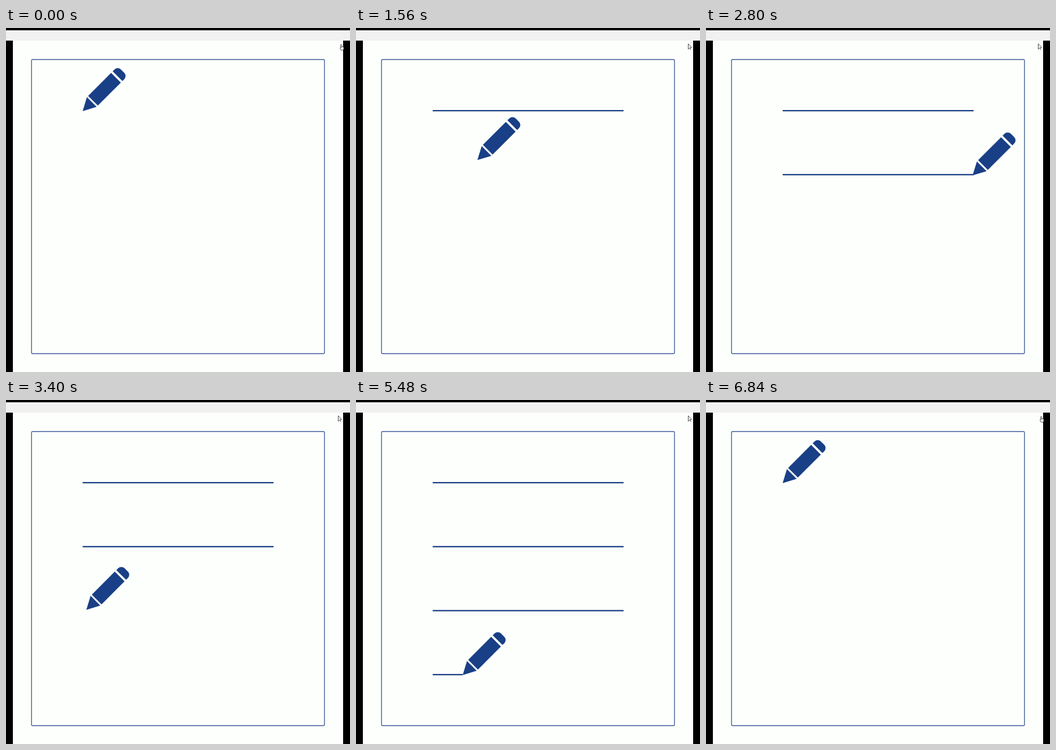
Recreate the animation shown at these times as an HTML page with a canvas. Size 600 px wide and 600 px high, loop 6880 ms.

```html
<!DOCTYPE html>
<html lang="en">
<head>
<meta charset="utf-8">
<title>Pencil writing lines</title>
<style>
html, body { margin: 0; width: 100%; height: 100%; overflow: hidden; background: #000; }
canvas { display: block; width: 600px; height: 600px; }
</style>
</head>
<body>
<canvas id="stage" width="600" height="600"></canvas>
<script>
const ctx = document.getElementById('stage').getContext('2d');
const LOOP = 6880, STEP = 40, START = 224, SEGMENT = 829;
const CLEAR = 6840, HAND_UNTIL = 120;
const LEFT = 133.7, RIGHT = 466.7, ROWS = 4;
const NAVY = '#193f86';

const rowY = i => 144.2 + 111.6 * i;
const mix = (a, b, p) => a + (b - a) * p;
const ease = p => p < 0.5 ? 4 * p ** 3 : 1 - 4 * (1 - p) ** 3;

// Even segments draw a row, odd ones carry the pencil to the next row.
function poseAt(t) {
  const time = t < CLEAR ? Math.max(0, t - START) / SEGMENT : 0;
  const n = Math.min(2 * ROWS - 1, Math.floor(time));
  const p = ease(Math.min(1, time - n));
  const row = n >> 1, y = rowY(row);
  if (n % 2 === 0) {
    const x = mix(LEFT, RIGHT, p);
    return { x, y, full: row, end: x };
  }
  const next = rowY((row + 1) % ROWS);
  return { x: mix(RIGHT, LEFT, p), y: mix(y, next, p), full: row + 1, end: LEFT };
}

function rect(color, x, y, w, h) {
  ctx.fillStyle = color;
  ctx.fillRect(x, y, w, h);
}

function roundRect(x, y, w, h, radii) {
  ctx.beginPath();
  ctx.roundRect(x, y, w, h, radii);
}

function drawPage() {
  rect('#000', 0, 0, 600, 600);
  rect('#f1f1f1', 0, 4, 600, 18);
  rect('#fdfffc', 12, 22, 576, 578);
  ctx.strokeStyle = '#3f5c98';
  ctx.lineWidth = 1.4;
  roundRect(44.5, 55, 511, 513, 2);
  ctx.stroke();
}

function drawRow(i, end) {
  rect(NAVY, LEFT, rowY(i) - 1.15, end - LEFT, 2.3);
}

// Built along the x axis from the tip, then turned by 45 degrees.
function drawPencil(x, y) {
  const half = 12;
  ctx.save();
  ctx.translate(x, y + 0.7);
  ctx.rotate(-Math.PI / 4);
  ctx.fillStyle = NAVY;
  ctx.beginPath();
  ctx.moveTo(0, 0);
  ctx.lineTo(22.5, -half);
  ctx.lineTo(22.5, half);
  ctx.fill();
  ctx.fillRect(25.5, -half, 56.7, 2 * half);
  roundRect(86, -half, 12.5, 2 * half, [0, 8, 8, 0]);
  ctx.fill();
  ctx.restore();
}

function drawHand() {
  roundRect(583, 32.5, 6, 6, 2);
  ctx.fill();
  ctx.stroke();
  roundRect(583.5, 28.5, 2, 6, 1);
  ctx.fill();
  ctx.stroke();
}

function drawArrow() {
  ctx.beginPath();
  ctx.moveTo(579.5, 27.5);
  ctx.lineTo(579.5, 37);
  ctx.lineTo(582, 34.8);
  ctx.lineTo(585.5, 34);
  ctx.closePath();
  ctx.fill();
  ctx.moveTo(582.5, 35);
  ctx.lineTo(584, 38);
  ctx.stroke();
}

function drawCursor(hand) {
  ctx.fillStyle = '#fff';
  ctx.strokeStyle = '#4c4c50';
  ctx.lineWidth = 1;
  if (hand) drawHand();
  else drawArrow();
}

function draw(t) {
  const pen = poseAt(t);
  drawPage();
  for (let i = 0; i < pen.full; i++) drawRow(i, RIGHT);
  if (pen.end > LEFT) drawRow(pen.full, pen.end);
  drawPencil(pen.x, pen.y);
  drawCursor(t < HAND_UNTIL || t >= CLEAR);
}

const origin = performance.now();
function tick() {
  const t = (performance.now() - origin) % LOOP;
  draw(Math.floor(t / STEP) * STEP);
  requestAnimationFrame(tick);
}
tick();
</script>
</body>
</html>
```
